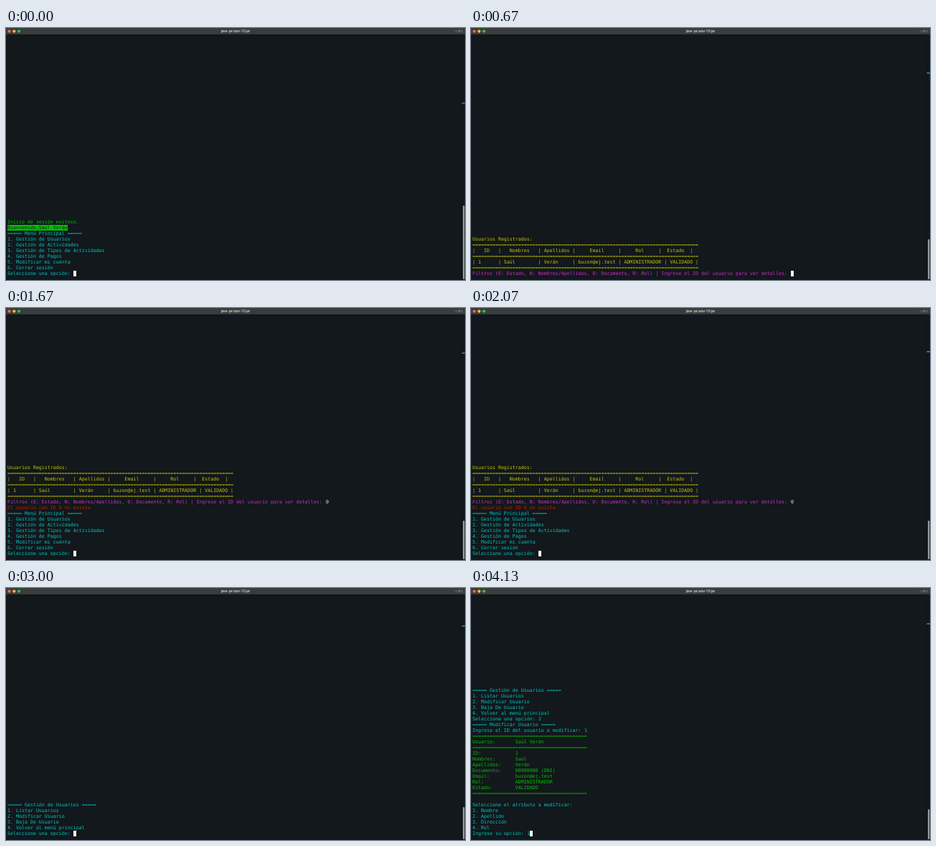
Recreate the animation shown at these times as an HTML page with a canvas. Size 640x352 px, loop 4.2 s.

```html
<!DOCTYPE html>
<html lang="es">
<head>
<meta charset="utf-8">
<title>Terminal</title>
<style>
html, body { margin: 0; width: 100%; height: 100%; overflow: hidden; background: #12181b; }
canvas { display: block; width: 640px; height: 352px; }
</style>
</head>
<body>
<canvas id="stage" width="640" height="352"></canvas>
<script>
const ctx = document.getElementById("stage").getContext("2d");
const LOOP = 4200, CELL = 4, ROW = 8, LEFT = 2, BOTTOM = 345;
const BG = "#12181b", GREEN = "#00c200", YELLOW = "#c7c400", CYAN = "#00c5c7",
      MAGENTA = "#c930c7", RED = "#c91b00", WHITE = "#f4f4f4";
const TEAL = "#128a78", BLUE = "#3d4fb4", GREY = "#5c6264";
const MONO = '"DejaVu Sans Mono", monospace';

const first = "Saúl", last = "Verán", mail = "buzon@ej.test";

// A line is { color, text, input, inverse }.
const paint = (color, ...texts) => texts.map(text => ({ color, text }));
const heading = name => `===== ${name} =====`;
const typed = (lines, input, color) => {
  const end = lines[lines.length - 1];
  return [...lines.slice(0, -1), { ...end, input, inputColor: color || end.color }];
};

const CHOOSE = "Seleccione una opción: ";
const mainMenu = paint(CYAN, heading("Menú Principal"),
  "1. Gestión de Usuarios", "2. Gestión de Actividades",
  "3. Gestión de Tipos de Actividades", "4. Gestión de Pagos",
  "5. Modificar mi cuenta", "6. Cerrar sesión", CHOOSE);

const welcome = [
  ...paint(GREEN, "Inicio de sesión exitoso."),
  { color: GREEN, text: `Bienvenido,${first} ${last}`, inverse: true },
  ...mainMenu
];

const userMenu = paint(CYAN, heading("Gestión de Usuarios"),
  "1. Listar Usuarios", "2. Modificar Usuario", "3. Baja De Usuario",
  "4. Volver al menú principal", CHOOSE);

const wide = "=".repeat(79);
const tableHead = paint(YELLOW, "Usuarios Registrados:", wide,
  "|   ID   |   Nombres   | Apellidos |     Email     |     Rol     |  Estado  |", wide);
const tableRow = "| " + [
  ["1", 6], [first, 11], [last, 9], [mail, 13], ["ADMINISTRADOR", 13], ["VALIDADO", 8]
].map(([text, width]) => text.padEnd(width)).join(" | ") + " |";
const table = [
  ...tableHead,
  ...paint(YELLOW, tableRow, wide),
  ...paint(MAGENTA, "Filtros (E: Estado, N: Nombres/Apellidos, D: Documento, R: Rol) | " +
    "Ingrese el ID del usuario para ver detalles: ")
];
const missing = [
  ...typed(table, "0", WHITE),
  ...paint(RED, "El usuario con ID 0 no existe."),
  ...mainMenu
];

const edit = [
  ...typed(userMenu, "2"),
  ...paint(CYAN, heading("Modificar Usuario"), "Ingrese el ID del usuario a modificar: ")
];
const rule = "=".repeat(40);
const field = (name, value) => `${name}:`.padEnd(15) + value;
const details = [
  ...typed(edit, "1"),
  ...paint(GREEN, rule, field("Usuario", `${first} ${last}`), rule,
    field("ID", "1"), field("Nombres", first), field("Apellidos", last),
    field("Documento", "00000000 (DNI)"), field("Email", mail),
    field("Rol", "ADMINISTRADOR"), field("Estado", "VALIDADO"), rule, ""),
  ...paint(CYAN, "Seleccione el atributo a modificar:", "1. Nombre", "2. Apellido",
    "3. Dirección", "4. Rol", "Ingrese su opción: ")
];

const step = (at, lines, thumb, mark, tint) => ({ at, lines, thumb, mark, tint });
const steps = [
  step(0, welcome, 248, 105, BLUE),
  step(70, typed(welcome, "1"), 248, 105, BLUE),
  step(130, userMenu, 277, 90, TEAL),
  step(200, typed(userMenu, "1"), 277, 90, TEAL),
  step(270, [...tableHead, ...paint(YELLOW, "")], 294, 78, TEAL),
  step(530, table, 295, 63, TEAL),
  step(1530, typed(table, "0", WHITE), 295, 63, TEAL),
  step(1600, missing, 297, 63, GREY),
  step(1800, missing, 297, 61, TEAL),
  step(2800, typed(missing, "1"), 297, 61, TEAL),
  step(2930, userMenu, 306, 53, TEAL),
  step(3330, typed(userMenu, "2"), 306, 53, TEAL),
  step(3470, edit, 307, 52, TEAL),
  step(3870, typed(edit, "1"), 307, 52, TEAL),
  step(3930, details, 309, 50, GREY),
  step(4070, typed(details, "1"), 309, 50, GREY)
];

function rect(color, x, y, w, h) {
  ctx.fillStyle = color;
  ctx.fillRect(x, y, w, h);
}

function label(text, x, y, color, font, align = "left") {
  ctx.font = font;
  ctx.textAlign = align;
  ctx.fillStyle = color;
  ctx.fillText(text, x, y);
}

function titleBar() {
  rect("#3a3d3f", 0, 0, 640, 9);
  rect("#0c1012", 0, 9, 640, 0.6);
  ["#fe5f57", "#febc2e", "#28c840"].forEach((color, i) => {
    ctx.fillStyle = color;
    ctx.beginPath();
    ctx.arc(4.6 + i * 6.7, 4.6, 2.1, 0, Math.PI * 2);
    ctx.fill();
  });
  label("java -jar azur-1.0.jar", 320, 6.2, "#e2e3e3", "600 4.2px Inter, sans-serif", "center");
  label("⌥⌘2", 637, 6, "#9a9d9e", '4.4px "DejaVu Sans", sans-serif', "right");
}

function terminal(lines) {
  const font = `6.644px ${MONO}`;
  lines.forEach((line, i) => {
    const y = BOTTOM - (lines.length - 1 - i) * ROW;
    const end = LEFT + line.text.length * CELL;
    if (line.inverse) rect(line.color, LEFT, y - 6, end - LEFT, ROW);
    label(line.text, LEFT, y, line.inverse ? BG : line.color, font);
    if (line.input) label(line.input, end, y, line.inputColor, font);
  });
  const { text, input = "" } = lines[lines.length - 1];
  rect(WHITE, LEFT + (text.length + input.length) * CELL, BOTTOM - 6, CELL, ROW);
}

function scrollBar({ thumb, mark, tint }) {
  rect("#0f1417", 635, 10, 1, 342);
  rect(tint, 635.5, mark - 1, 4.5, 2);
  ctx.fillStyle = "#96999a";
  ctx.beginPath();
  ctx.roundRect(637, thumb, 2.4, 351 - thumb, 1.2);
  ctx.fill();
}

function draw(now) {
  const time = now % LOOP;
  const current = steps.filter(s => s.at <= time).pop();
  rect(BG, 0, 0, 640, 352);
  titleBar();
  terminal(current.lines);
  scrollBar(current);
}

const start = performance.now();
function tick(now) {
  draw(Math.max(0, now - start));
  requestAnimationFrame(tick);
}
draw(0);
requestAnimationFrame(tick);
</script>
</body>
</html>
```
